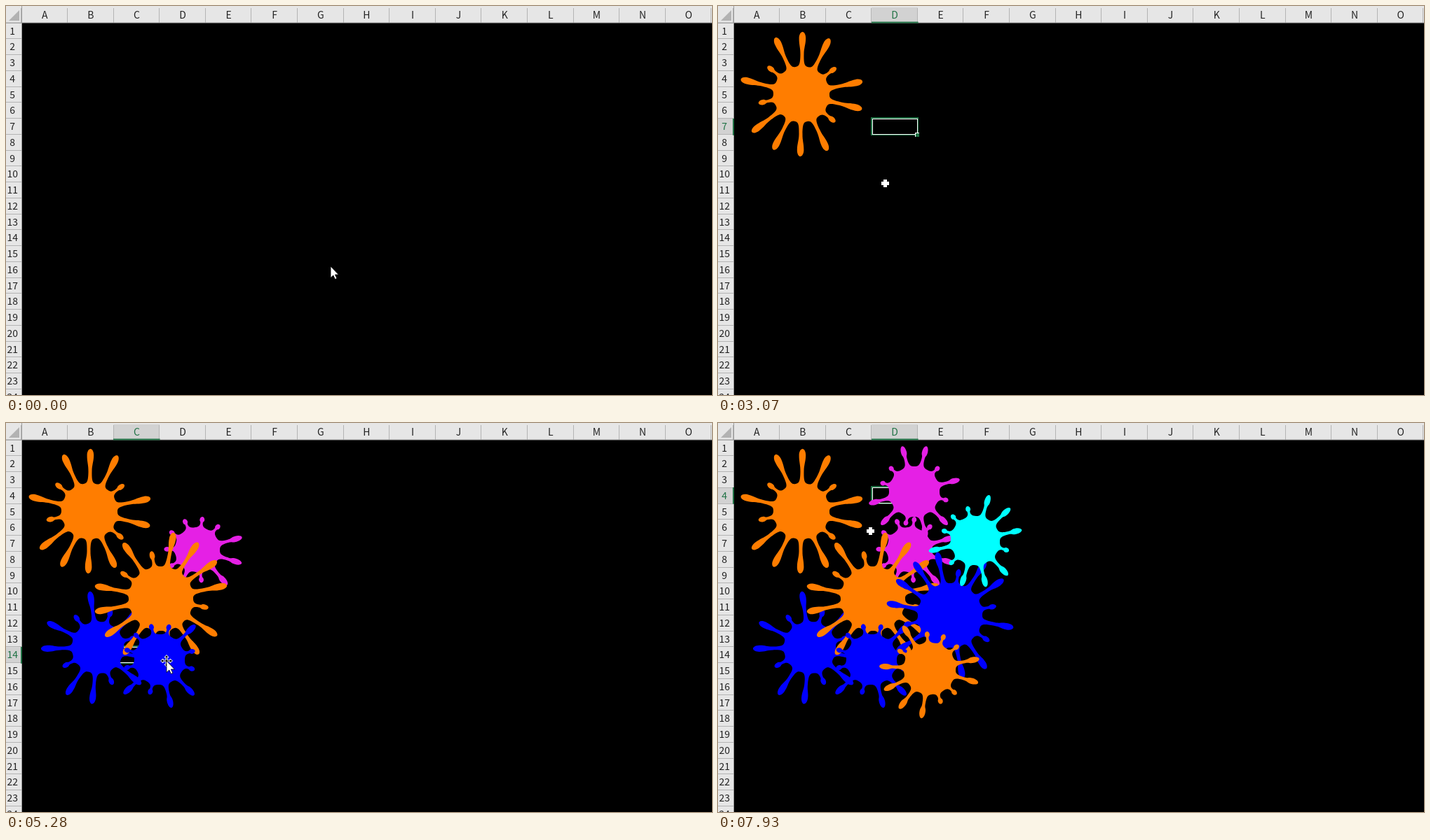
Animation of 1007 by 556 pixels, one loop 7.99 s. Source, as an HTML page:

```html
<!DOCTYPE html>
<html lang="en">
<head>
<meta charset="utf-8">
<title>Paint sheet</title>
<style>
  html, body { margin: 0; width: 100%; height: 100%; overflow: hidden; background: #000; }
  svg { display: block; width: 100vw; height: 100vh; }
  text { font: 300 14px "Noto Sans CJK JP", "Noto Sans", sans-serif; text-anchor: middle; fill: #222; }
  text.on { fill: #217346; }
</style>
</head>
<body>
<svg id="stage" viewBox="0 0 1007 556"></svg>
<script>
const LOOP = 7990, COLS = 15, ROWS = 24;
const X0 = 22.4, Y0 = 24.5, CW = 65.6, RH = 22.75;
const GREEN = '#217346', ORANGE = '#ff7d00', BLUE = '#0000ff', PINK = '#e520e5', CYAN = '#00ffff';
const PRESS = 60, GLIDE_DELAY = 35, GLIDE = 240, SPLAT_DELAY = 350;
const stage = document.getElementById('stage');

function el(tag, attrs, parent = stage) {
  const node = document.createElementNS('http://www.w3.org/2000/svg', tag);
  set(node, attrs);
  parent.appendChild(node);
  return node;
}
function set(node, attrs) {
  for (const k in attrs) node.setAttribute(k, attrs[k]);
}
function show(node, on) {
  node.style.display = on ? '' : 'none';
}
const rect = (x, y, width, height, fill, parent) => el('rect', { x, y, width, height, fill }, parent);
const line = (x, y, x2, y2, color) => el('path', { d: `M${x} ${y}L${x2} ${y2}`, stroke: color });

rect(0, 0, 1007, 556, '#000');

// Cell marker, below the splats
const marker = el('g', {});
rect(-1, -2, 68, 26, GREEN, marker);
rect(1, 0, 65, 23, '#fff', marker);
rect(2, 1, 63, 21, '#000', marker);
rect(62, 20, 6, 6, '#fff', marker);
rect(63, 21, 5, 5, GREEN, marker);

// Evenly spread arms that leave the body in round valleys and end in drops
function splatPath(cx, cy, r, reach, phase, short) {
  const n = Math.floor(r * 0.352), step = 2 * Math.PI / n;
  const at = (a, along, side) =>
    (cx + along * Math.cos(a) - side * Math.sin(a)).toFixed(1) + ' ' +
    (cy + along * Math.sin(a) + side * Math.cos(a)).toFixed(1);
  const pull = r * step * 0.27;
  let d = '';
  for (let i = 0; i < n; i++) {
    const a = phase * Math.PI / 180 + i * step;
    const arm = (reach - r) * (short.includes(i) ? 0.46 : 1);
    const tip = r + arm, w = 2.8 + arm * 0.04, neck = w * 0.52;
    const mid = r + Math.min(arm * 0.4, r * 0.42), bulb = tip - Math.min(9, arm * 0.28);
    const cap = bulb + (tip - bulb) * 0.55;
    const before = a - step / 2, after = a + step / 2;
    if (!i) d = 'M' + at(before, r, 0);
    d += `C${at(before, r, pull)} ${at(a, r + 2, -neck)} ${at(a, mid, -neck)}`;
    d += `C${at(a, mid + arm * 0.2, -neck)} ${at(a, bulb - arm * 0.2, -w)} ${at(a, bulb, -w)}`;
    d += `C${at(a, cap, -w)} ${at(a, tip, -w * 0.55)} ${at(a, tip, 0)}`;
    d += `C${at(a, tip, w * 0.55)} ${at(a, cap, w)} ${at(a, bulb, w)}`;
    d += `C${at(a, bulb - arm * 0.2, w)} ${at(a, mid + arm * 0.2, neck)} ${at(a, mid, neck)}`;
    d += `C${at(a, r + 2, neck)} ${at(after, r, -pull)} ${at(after, r, 0)}`;
  }
  return d + 'Z';
}

// Each splat follows a click at its centre; the cell below gets selected
const splats = [];
function splat(click, fill, x, y, r, reach, phase, ...short) {
  splats.push({
    click, x, y, r,
    col: Math.floor((x - X0) / CW),
    row: Math.floor((y + 2 - Y0) / RH),
    node: el('path', { d: splatPath(x, y, r, reach, phase, short), fill })
  });
}
splat(1210, ORANGE, 119, 126, 40, 89, -89, 2, 5, 10, 12);
splat(2790, PINK, 273, 181, 32, 66, -81, 0, 1, 5, 7, 8, 9, 10);
splat(3590, BLUE, 131, 321, 37, 81, -98, 1, 3, 6, 9, 12);
splat(4200, ORANGE, 221, 251, 46, 96, -79, 4, 7, 8, 13, 15);
splat(4860, BLUE, 219, 338, 36, 71, -104, 0, 1, 3, 4, 7, 9, 10, 11);
splat(5560, BLUE, 331, 275, 46, 92, -124, 2, 5, 7, 10, 11, 13);
splat(6310, ORANGE, 302, 351, 37, 72, -122, 1, 2, 3, 6, 7, 12);
splat(6870, CYAN, 367, 168, 35, 68, -73, 3, 7, 9, 10, 11);
splat(7500, PINK, 280, 98, 36, 67, -105, 2, 4, 7, 10, 11);

// Headers
rect(0, 0, 1007, 24, '#e6e6e6');
rect(0, 0, 22, 556, '#e6e6e6');
const colShade = rect(0, 2, CW, 22, '#d2d2d2');
const rowShade = rect(0, 0, 22, RH, '#d2d2d2');
const colText = [], rowText = [];
for (let i = 0; i <= COLS; i++) {
  const x = Math.round(X0 + i * CW) - 0.5;
  line(x, 3, x, 24, '#b4b4b4');
  if (i < COLS) {
    const t = el('text', { x: X0 + (i + 0.5) * CW, y: 17.5 });
    t.textContent = String.fromCharCode(65 + i);
    colText.push(t);
  }
}
for (let i = 0; i < ROWS; i++) {
  const y = Math.round(Y0 + i * RH) - 0.5;
  line(0, y, 22, y, '#b4b4b4');
  const t = el('text', { x: 9.2, y: Y0 + (i + 0.5) * RH + 4.8 });
  t.textContent = i + 1;
  rowText.push(t);
}
line(0, 24, 1007, 24, '#9c9c9c');
line(22.5, 0, 22.5, 556, '#9c9c9c');
el('path', { d: 'M19 6V21H4Z', fill: '#b2b2b2' });
const colBar = rect(0, 22.5, CW + 1, 2, GREEN);
const rowBar = rect(21, 0, 2, RH + 1, GREEN);

// Pointer looks
const pointer = el('g', {});
const tipShape = {
  d: 'M0 0V16.5L3.8 13L6.4 18.6L9 17.4L6.4 12H11.4Z',
  fill: '#fff', stroke: '#000', 'stroke-width': 0.8
};
const arrow = el('path', tipShape, pointer);
const cross = el('path', { d: 'M-2 -5h5v3h3v5h-3v3h-5v-3h-3v-5h3Z', fill: '#fff' }, pointer);
const ring = el('circle', { cx: 0.5, cy: 0.5, r: 8.4, fill: 'none', stroke: '#fff', 'stroke-width': 1.2 }, pointer);
const mover = el('g', {}, pointer);
el('path', {
  d: 'M-1 -1V-5H-3L0 -8.5L3 -5H1V-1H5V-3L8.5 0L5 3V1H1V5H3L0 8.5L-3 5H-1V1H-5V3L-8.5 0L-5 -3V-1Z',
  fill: '#000', stroke: '#fff'
}, mover);
el('path', tipShape, mover);

// The pointer rests on each centre around its click; a few more stops bend the way
const stops = [
  [0, 463, 372], [30, 463, 372], [290, 330, 398], [710, 119, 126], [1880, 119, 126], [2120, 273, 181],
  [3070, 238, 253], [5280, 229, 340], [6060, 302, 351], [7930, 217, 154]
];
for (const { click, x, y } of splats) stops.push([click - PRESS, x, y], [click + PRESS, x, y]);
stops.sort((a, b) => a[0] - b[0]);

function slope(i, axis) {
  const p = stops[i - 1], k = stops[i], q = stops[i + 1];
  if (!p || !q) return 0;
  const still = (a, b) => a[1] === b[1] && a[2] === b[2];
  return still(p, k) || still(k, q) ? 0 : (q[axis] - p[axis]) / (q[0] - p[0]);
}
function pointerAt(t) {
  let i = 0;
  while (i < stops.length - 2 && t >= stops[i + 1][0]) i++;
  const a = stops[i], b = stops[i + 1], h = b[0] - a[0];
  const u = Math.min(1, (t - a[0]) / h), ease = u * u * (3 - 2 * u);
  return [1, 2].map(k => Math.round(a[k] + (b[k] - a[k]) * ease +
    h * u * (1 - u) * ((1 - u) * slope(i, k) - u * slope(i + 1, k))));
}

function draw(t) {
  let from = { col: 2, row: 12 }, cell = from, start = 0;
  for (const s of splats) {
    show(s.node, t >= s.click + SPLAT_DELAY);
    if (t >= s.click + GLIDE_DELAY) {
      from = cell;
      cell = s;
      start = s.click + GLIDE_DELAY;
    }
  }
  const u = Math.min(1, (t - start) / GLIDE);
  const x = Math.floor(X0 + (from.col + (cell.col - from.col) * u) * CW);
  const y = Math.floor(Y0 + (from.row + (cell.row - from.row) * u) * RH);
  const selected = t >= 90;
  [marker, colShade, rowShade, colBar, rowBar].forEach(n => show(n, selected));
  set(marker, { transform: `translate(${x} ${y})` });
  set(colBar, { x });
  set(rowBar, { y });
  set(colShade, { x: X0 + cell.col * CW });
  set(rowShade, { y: Y0 + cell.row * RH });
  colText.forEach((n, i) => n.classList.toggle('on', selected && i === cell.col));
  rowText.forEach((n, i) => n.classList.toggle('on', selected && i === cell.row));

  const [px, py] = pointerAt(t);
  const over = splats.some(s => t >= s.click + SPLAT_DELAY && Math.hypot(px - s.x, py - s.y) < s.r);
  set(pointer, { transform: `translate(${px} ${py})` });
  show(arrow, t < 30);
  show(cross, t >= 30 && !over);
  show(mover, t >= 30 && over);
  show(ring, splats.some(s => t >= s.click && t < s.click + 2 * PRESS));
}

const began = performance.now();
function tick() {
  draw((performance.now() - began) % LOOP);
  requestAnimationFrame(tick);
}
draw(0);
requestAnimationFrame(tick);
</script>
</body>
</html>
```
